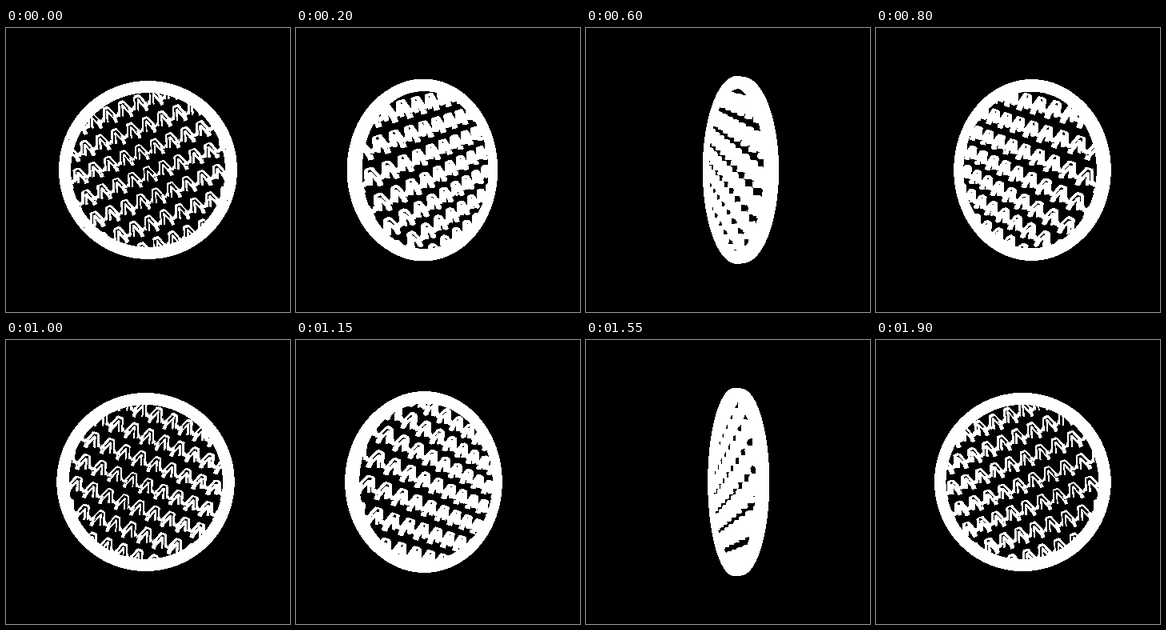
An HTML page that plays this animation: 355x355 px, repeating every 1950 ms.

```html
<!DOCTYPE html>
<html>
<head>
<meta charset="utf-8">
<style>
html, body { margin: 0; width: 100%; height: 100%; overflow: hidden; background: #000; }
svg { display: block; width: 100vw; height: 100vh; }
</style>
</head>
<body>
<svg viewBox="0 0 355 355"><path id="disc" fill="#fff" shape-rendering="crispEdges"/></svg>
<script>
const LOOP = 1950, STEP = 50;
const CENTER = 177.5, CAMERA = 305, HALF_DEPTH = 3.5;
const OUTER = 110.2, INNER = 97.5;
const TILT = -21 * Math.PI / 180, PITCH = 20.5, ROW_GAP = 29, ROW_SHIFT = 6;

// One link of the chain: x1, y1, x2, y2, width
const LINK = [
  [-9, 5, -4, -10, 1.7],
  [-4, -10, 2, -10, 1.7],
  [2, -10, 8, 5, 1.7],
  [-5, 7, -1, -6, 1.7],
  [-1, -6, 4, 7, 1.7],
  [4, 3, 8, 3, 4],
  [5, 6, 5, 11, 4],
  [8, 5, 12, 1, 2]
];

const solids = [];

function addBar(x1, y1, x2, y2, width) {
  const len = Math.hypot(x2 - x1, y2 - y1);
  const nx = (y1 - y2) / len * width / 2, ny = (x2 - x1) / len * width / 2;
  const corners = [[x1 + nx, y1 + ny], [x2 + nx, y2 + ny], [x2 - nx, y2 - ny], [x1 - nx, y1 - ny]];
  if (corners.every(([x, y]) => Math.hypot(x, y) > INNER)) return;
  solids.push(corners.map(([x, y]) => {
    const k = Math.min(1, (INNER + 4) / Math.hypot(x, y));
    return [x * k, y * k];
  }));
}

function addRing(count) {
  const at = (r, i) => [r * Math.cos(i * 2 * Math.PI / count), r * Math.sin(i * 2 * Math.PI / count)];
  for (let i = 0; i < count; i++) {
    solids.push([at(OUTER, i), at(OUTER, i + 1), at(INNER, i + 1), at(INNER, i)]);
  }
}

function addChains() {
  const c = Math.cos(TILT), s = Math.sin(TILT);
  const turn = (u, v) => [u * c - v * s, u * s + v * c];
  for (let row = -4; row <= 4; row++) {
    for (let col = -6; col <= 6; col++) {
      const u = col * PITCH, v = row * ROW_GAP + ROW_SHIFT;
      for (const [x1, y1, x2, y2, w] of LINK) {
        addBar(...turn(u + x1, v + y1), ...turn(u + x2, v + y2), w);
      }
    }
  }
}

function hull(points) {
  points.sort((a, b) => a[0] - b[0] || a[1] - b[1]);
  const half = list => {
    const out = [];
    for (const p of list) {
      while (out.length > 1) {
        const [a, b] = out.slice(-2);
        if ((b[0] - a[0]) * (p[1] - a[1]) - (b[1] - a[1]) * (p[0] - a[0]) > 0) break;
        out.pop();
      }
      out.push(p);
    }
    return out.slice(0, -1);
  };
  return [...half(points), ...half(points.slice().reverse())];
}

function draw(time) {
  const angle = 2 * Math.PI * time / LOOP;
  const c = Math.cos(angle), s = Math.sin(angle);
  const project = ([x, y], z) => {
    const k = CAMERA / (CAMERA + x * s - z * c);
    return [CENTER + (x * c + z * s) * k, CENTER + y * k];
  };
  const outline = solid => {
    const points = solid.flatMap(p => [project(p, HALF_DEPTH), project(p, -HALF_DEPTH)]);
    return 'M' + hull(points).map(p => p[0].toFixed(2) + ' ' + p[1].toFixed(2)).join('L') + 'Z';
  };
  disc.setAttribute('d', solids.map(outline).join(''));
}

const disc = document.getElementById('disc');
const start = performance.now();
let shown = -1;

function tick() {
  const time = Math.floor((performance.now() - start) % LOOP / STEP) * STEP;
  if (time !== shown) draw(shown = time);
  requestAnimationFrame(tick);
}

addRing(120);
addChains();
tick();
</script>
</body>
</html>
```
